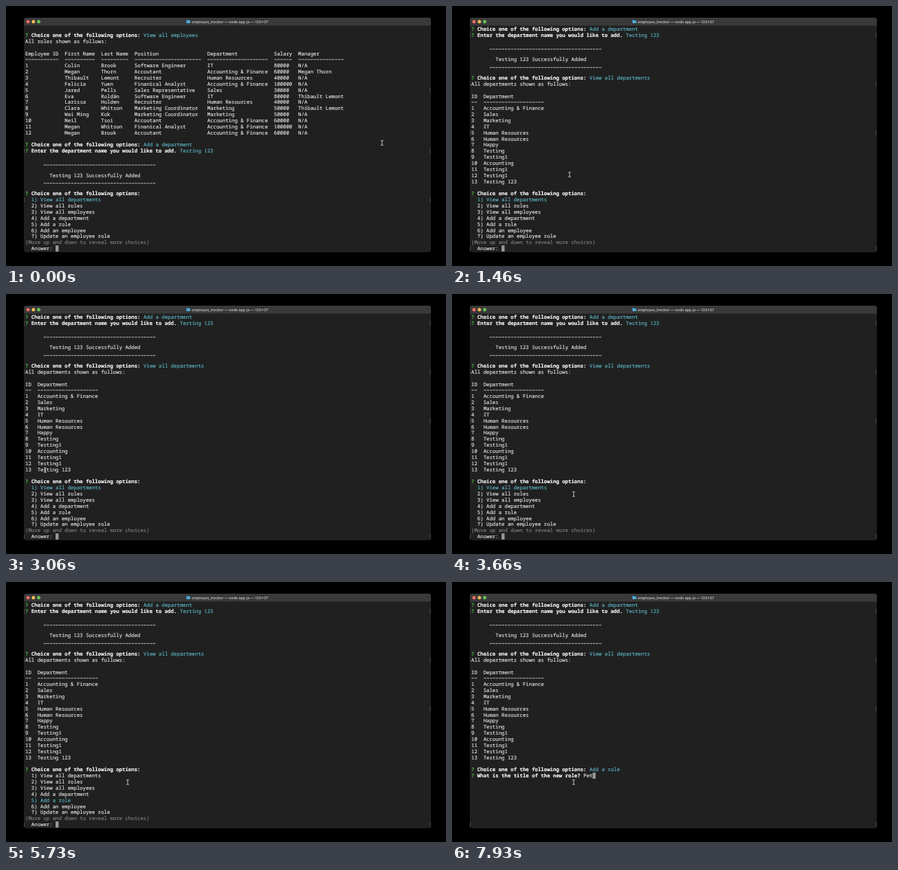
Recreate the animation shown at these times as an HTML page with a canvas. Size 640 px wide and 378 px high, loop 8 s.

```html
<!DOCTYPE html>
<html lang="en">
<head>
<meta charset="utf-8">
<title>Terminal</title>
<style>
  html, body { margin: 0; width: 100%; height: 100%; overflow: hidden; background: #000; }
  canvas { display: block; }
</style>
</head>
<body>
<canvas id="stage" width="640" height="378"></canvas>
<script>
const ctx = document.getElementById('stage').getContext('2d');
const LOOP = 8000, LEFT = 28, CELL = 4.412, TOP = 33.5, ROW = 8.863;
const BG = '#202020', WHITE = '#e2e2e2', BOLD = '#f4f4f4', CYAN = '#5cb3c2', GREEN = '#45a83c', GREY = '#7d7d7d';
const FONT = '7.353px "Noto Sans Mono", "DejaVu Sans Mono", monospace';

const colX = col => LEFT + col * CELL;
const rowY = row => TOP + row * ROW;

// A hairline stroke gives the text its medium weight.
function write(row, col, text, color = WHITE, weight = 500) {
  ctx.font = `${weight} ${FONT}`;
  ctx.fillStyle = ctx.strokeStyle = color;
  ctx.lineWidth = 0.16;
  ctx.fillText(text, colX(col), rowY(row) + 2.6);
  ctx.strokeText(text, colX(col), rowY(row) + 2.6);
}

function dashes(row, col, count, drop = 0) {
  const y = rowY(row) + drop;
  ctx.strokeStyle = WHITE;
  ctx.lineWidth = 0.8;
  ctx.setLineDash([CELL * 0.8, CELL * 0.2]);
  ctx.beginPath();
  ctx.moveTo(colX(col + 0.1), y);
  ctx.lineTo(colX(col + count), y);
  ctx.stroke();
  ctx.setLineDash([]);
}

function prompt(row, question, answer = '') {
  write(row, 0, '?', GREEN, 700);
  write(row, 2, question, BOLD, 700);
  write(row, question.length + 3, answer, CYAN);
}

const choose = (row, answer) => prompt(row, 'Choice one of the following options:', answer);

function block(row, col) {
  ctx.fillStyle = '#999';
  ctx.fillRect(colX(col), rowY(row) - 4.5, CELL, ROW);
}

function table(row, heads, widths, rows) {
  let col = 0;
  widths.forEach((width, j) => {
    write(row, col, heads[j]);
    dashes(row + 1, col, width);
    rows.forEach((cells, i) => write(row + 2 + i, col, String(cells[j])));
    col += width + 2;
  });
}

function added(row) {
  choose(row, 'Add a department');
  prompt(row + 1, 'Enter the department name you would like to add.', 'Testing 123');
  dashes(row + 3, 6, 37, 2.7);
  write(row + 5, 8, 'Testing 123 Successfully Added');
  dashes(row + 6, 6, 37, 2.7);
}

const IT = 'IT', HR = 'Human Resources', FIN = 'Accounting & Finance', MKT = 'Marketing';
const LEAD = 'Thibault Lemont';
const employees = [
  ['Colin', 'Brook', 'Software Engineer', IT, 80000],
  ['Megan', 'Thorn', 'Accoutant', FIN, 60000, 'Megan Thorn'],
  ['Thibault', 'Lemont', 'Recruiter', HR, 40000],
  ['Felicia', 'Yuen', 'Finanical Analyst', FIN, 100000],
  ['Jared', 'Pells', 'Sales Representative', 'Sales', 30000],
  ['Eva', 'Roldán', 'Software Engineer', IT, 80000, LEAD],
  ['Larissa', 'Holden', 'Recruiter', HR, 40000],
  ['Clara', 'Whitson', 'Marketing Coordinator', MKT, 50000, LEAD],
  ['Wai Ming', 'Kok', 'Marketing Coordinator', MKT, 50000],
  ['Neil', 'Tsoi', 'Accoutant', FIN, 60000],
  ['Megan', 'Whitson', 'Finanical Analyst', FIN, 100000],
  ['Megan', 'Brook', 'Accoutant', FIN, 60000],
].map(([first, last, job, dept, pay, boss = 'N/A'], i) => [i + 1, first, last, job, dept, pay, boss]);

const departments = [FIN, 'Sales', MKT, IT, HR, HR, 'Happy', 'Testing', 'Testing1',
  'Accounting', 'Testing1', 'Testing1', 'Testing 123'].map((name, i) => [i + 1, name]);

const options = ['View all departments', 'View all roles', 'View all employees', 'Add a department',
  'Add a role', 'Add an employee', 'Update an employee role'];

const PICK_TIMES = [4060, 4660, 5130, 5730];
const ROLE_TIME = 6260;
const KEY_TIMES = [6930, 7330, 7930];
const SELECT = { from: 2330, to: 3060, row: 25, endCol: 10 };
const mousePath = [
  [860, 547, 199], [1130, 371, 222], [1460, 171, 245], [1560, 171, 245], [2130, 73, 256],
  [2330, 73, 256], [2580, 57, 256], [3100, 57, 256], [3660, 177, 291],
];

const passed = (times, t) => times.filter(time => t >= time).length;

function mouseAt(t) {
  const next = mousePath.findIndex(([time]) => t < time);
  if (next === 0) return mousePath[0].slice(1);
  if (next < 0) return mousePath.at(-1).slice(1);
  const [t0, x0, y0] = mousePath[next - 1], [t1, x1, y1] = mousePath[next];
  const p = (t - t0) / (t1 - t0), k = p * p * (3 - 2 * p);
  return [x0 + (x1 - x0) * k, y0 + (y1 - y0) * k];
}

function windowFrame(marks) {
  ctx.fillStyle = '#000';
  ctx.fillRect(0, 0, 640, 378);
  ctx.save();
  ctx.beginPath();
  ctx.roundRect(26, 17, 592, 341, 3.5);
  ctx.clip();
  ctx.fillStyle = BG;
  ctx.fillRect(26, 17, 592, 341);
  ctx.fillStyle = '#39393a';
  ctx.fillRect(26, 17, 592, 11.5);
  ctx.restore();
  ['#ee6a5f', '#f0bd4f', '#61c354'].forEach((color, i) => {
    ctx.fillStyle = color;
    ctx.beginPath();
    ctx.arc(32 + i * 7.8, 22.8, 2.5, 0, 7);
    ctx.fill();
  });
  ctx.fillStyle = '#4fa9d3';
  ctx.fillRect(262.5, 20.3, 2.5, 1);
  ctx.fillRect(262.5, 21, 5.5, 4);
  ctx.font = 'bold 5.3px Inter, sans-serif';
  ctx.fillStyle = '#b5b5b5';
  ctx.fillText('employee_tracker — node app.js — 133×37', 270, 24.6);
  ctx.fillStyle = '#575757';
  for (const row of marks) {
    ctx.fillRect(26.3, rowY(row) - 3.5, 0.8, 7);
    ctx.fillRect(616.6, rowY(row) - 3.5, 0.8, 7);
  }
}

function employeeScreen() {
  choose(1, 'View all employees');
  write(2, 0, 'All roles shown as follows:');
  table(4, ['Employee ID', 'First Name', 'Last Name', 'Position', 'Department', 'Salary', 'Manager'],
    [11, 10, 9, 22, 20, 6, 15], employees);
  added(19);
}

function departmentScreen() {
  added(0);
  choose(8, 'View all departments');
  write(9, 0, 'All departments shown as follows:');
  table(11, ['ID', 'Department'], [2, 20], departments);
}

function menu(picked) {
  choose(27);
  options.forEach((name, i) => write(28 + i, 2, `${i + 1}) ${name}`, i === picked ? CYAN : WHITE));
  write(35, 0, '(Move up and down to reveal more choices)', GREY);
  write(36, 2, 'Answer:');
  block(36, 10);
}

function roleQuestion(typed) {
  choose(27, 'Add a role');
  prompt(28, 'What is the title of the new role?');
  write(28, 37, typed);
  block(28, 37 + typed.length);
}

function selection(t, mouseX) {
  if (t < SELECT.from || t >= SELECT.to) return;
  const start = Math.floor((mouseX - LEFT) / CELL);
  ctx.fillStyle = '#7b6a80';
  ctx.fillRect(colX(start), rowY(SELECT.row) - 4.4, (SELECT.endCol - start) * CELL, ROW);
}

function iBeam(x, y) {
  ctx.strokeStyle = '#d8d8d8';
  ctx.lineWidth = 0.9;
  ctx.beginPath();
  for (const side of [-1, 1]) {
    ctx.moveTo(x - 1.8, y + side * 3.5);
    ctx.lineTo(x, y + side * 3);
    ctx.lineTo(x + 1.8, y + side * 3.5);
  }
  ctx.moveTo(x, y - 3);
  ctx.lineTo(x, y + 3);
  ctx.stroke();
}

function draw(now) {
  const t = now % LOOP, first = t < 60;
  const [x, y] = mouseAt(t);
  ctx.textRendering = 'geometricPrecision';
  windowFrame(first ? [10, 20, 28] : [1, 9, 17, 36]);
  selection(t, x);
  if (first) employeeScreen();
  else departmentScreen();
  if (t < ROLE_TIME) menu(passed(PICK_TIMES, t));
  else roleQuestion('Pet'.slice(0, passed(KEY_TIMES, t)));
  iBeam(x, y);
  requestAnimationFrame(draw);
}
requestAnimationFrame(draw);
</script>
</body>
</html>
```
